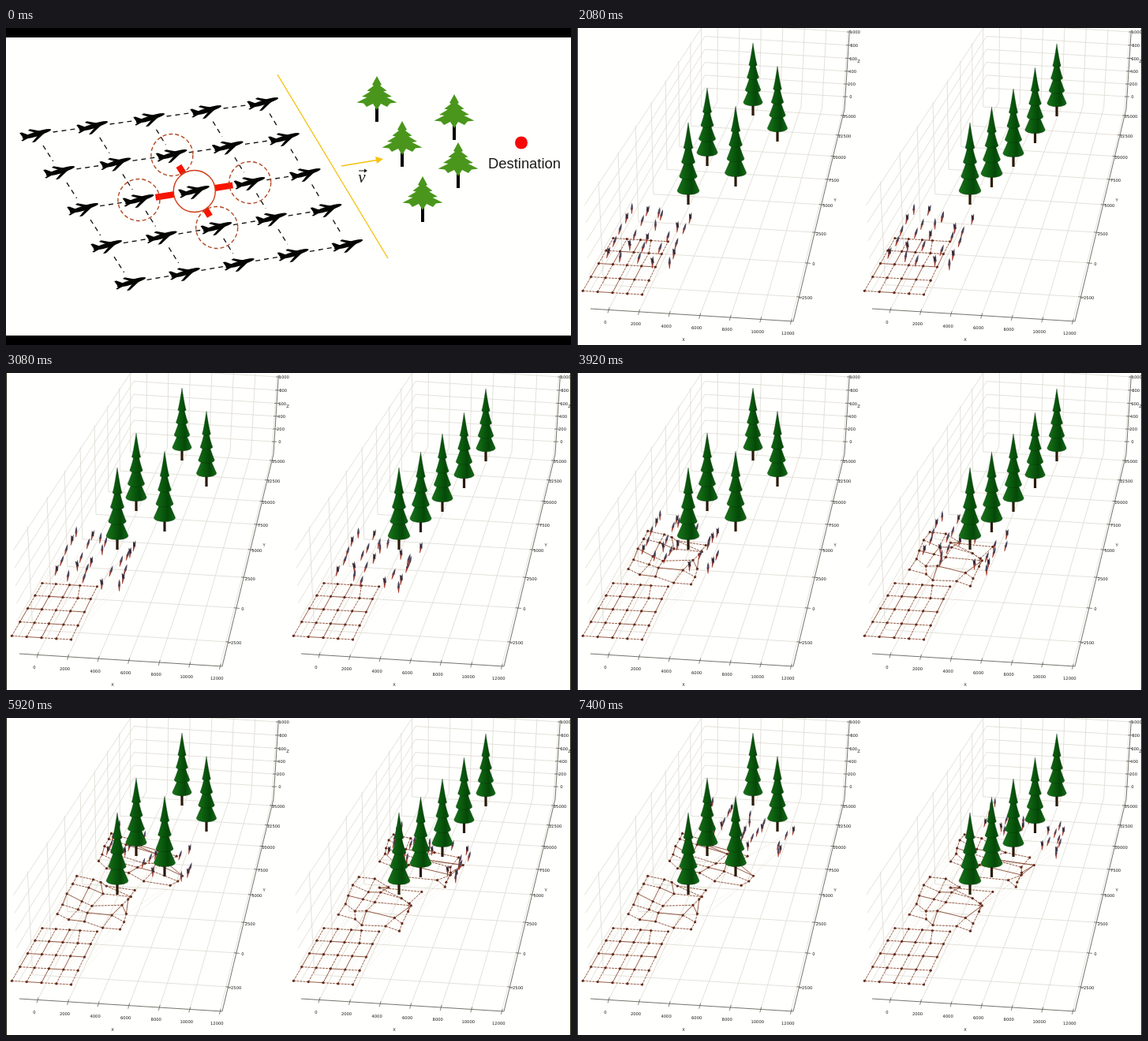
An HTML page with a canvas that plays this animation: 716x402 px, repeating every 7.56 s.

```html
<!DOCTYPE html>
<html lang="en">
<head>
<meta charset="utf-8">
<title>Swarm flight</title>
<style>
html, body { margin: 0; width: 100%; height: 100%; overflow: hidden; background: #fffffd; }
canvas { display: block; width: 716px; height: 402px; }
</style>
</head>
<body>
<canvas id="stage" width="716" height="402"></canvas>
<script>
const W = 716, H = 402, LOOP = 7560, CUT = 800, PANEL = 357;
const START = 850, LEG = 2270, STOP = 7400;
const PAPER = '#fffffd', INK = '#050500', BROWN = '#8a4a34';
const stage = document.getElementById('stage').getContext('2d');

function layer(paint) {
  const c = document.createElement('canvas');
  c.width = W; c.height = H;
  paint(c.getContext('2d'));
  return c;
}
function line(g, a, b, color, width = 1, dash = []) {
  g.strokeStyle = color;
  g.lineWidth = width;
  g.setLineDash(dash);
  g.beginPath();
  g.moveTo(a[0], a[1]);
  g.lineTo(b[0], b[1]);
  g.stroke();
  g.setLineDash([]);
}
function disc(g, x, y, r, color) {
  g.fillStyle = color;
  g.beginPath();
  g.arc(x, y, r, 0, 7);
  g.fill();
}
function ring(g, [x, y], color, dash) {
  g.strokeStyle = color;
  g.lineWidth = 1.4;
  g.setLineDash(dash);
  g.beginPath();
  g.arc(x, y, 26.5, 0, 7);
  g.stroke();
  g.setLineDash([]);
}
function poly(g, pts, color) {
  g.fillStyle = color;
  g.beginPath();
  pts.forEach(([x, y]) => g.lineTo(x, y));
  g.fill();
}
function label(g, s, x, y, font) {
  g.font = font;
  g.fillStyle = '#1a1a1a';
  g.textAlign = 'center';
  g.textBaseline = 'middle';
  g.fillText(s, x, y);
}
const mix = (a, b, f) => [a[0] + (b[0] - a[0]) * f, a[1] + (b[1] - a[1]) * f];
const noise = n => { const s = Math.sin(n * 127.1 + 3) * 43758.5; return s - Math.floor(s) - .5; };

// A 5 x 5 formation: i counts along a row, j counts rows.
const formation = place => Array.from({ length: 25 }, (_, k) => place(k % 5, Math.floor(k / 5), k));

function links(pts, visit) {
  for (let k = 0; k < 25; k++) {
    if (k % 5 < 4) visit(pts[k], pts[k + 1], k, k + 1);
    if (k < 20) visit(pts[k], pts[k + 5], k, k + 5);
  }
}

/* ---- opening diagram ---- */

const fleet = formation((i, j) => [38 + 72 * i + 30 * j - .8 * i * j, 135 - 10 * i + 47 * j - .5 * i * j]);
const HUB = 12, AROUND = [7, 11, 13, 17];

function airliner(g, [x, y]) {
  g.save();
  g.translate(x, y);
  g.rotate(-.2);
  g.fillStyle = INK;
  g.beginPath();
  g.ellipse(1, -.5, 19, 3, -.1, 0, 7);
  g.fill();
  poly(g, [[-17, 1], [-20, -6], [-17, -6], [-9, -1]], INK);
  poly(g, [[-14, 1], [-20, 4], [-18, 5], [-9, 2]], INK);
  poly(g, [[4, 0], [-7, 9], [-3, 9], [10, 1]], INK);
  poly(g, [[7, -3], [-6, -8], [-9, -7], [0, -2]], INK);
  g.restore();
}

function broadTree(g, x, y) {
  g.fillStyle = '#000';
  g.fillRect(x - 2, y + 26, 4, 32);
  const side = [];
  for (let n = 0; n < 4; n++) {
    const reach = 6 + 6.5 * n, drop = 11 + 7.5 * n;
    side.push([reach, drop], [reach * .66, drop + 1]);
  }
  side.push([13, 39], [5, 35]);
  const mirrored = side.map(([a, b]) => [-a, b]).reverse();
  const outline = [[0, 0], ...side, [0, 43], ...mirrored];
  poly(g, outline.map(([a, b]) => [x + a, y + b]), '#4a961c');
}

const diagram = layer(g => {
  g.fillStyle = '#000';
  g.fillRect(0, 0, W, H);
  g.fillStyle = PAPER;
  g.fillRect(0, 12, W, 378);

  links(fleet, (a, b, m, n) => {
    if (m === HUB || n === HUB) line(g, mix(a, b, .3), mix(a, b, .69), '#f81400', 8);
    else line(g, mix(a, b, .3), mix(a, b, .72), '#111', 1.3, [6, 5]);
  });
  AROUND.forEach(n => ring(g, fleet[n], '#b04a24', [5, 3]));
  disc(g, ...fleet[HUB], 26.5, PAPER);
  ring(g, fleet[HUB], '#d03c18', []);
  fleet.forEach(p => airliner(g, p));

  line(g, [344, 59], [484, 292], '#f5c211', 1.4);
  line(g, [425, 175], [470, 167.5], '#f5c211', 1.6);
  poly(g, [[478, 166], [468, 163], [470, 172]], '#f5c211');
  label(g, 'v', 451, 190, 'italic 21px "Liberation Serif", serif');
  line(g, [447, 181], [456, 181], '#111', 1);
  poly(g, [[458, 181], [454, 178.5], [454, 183.5]], '#111');

  for (const [x, y] of [[470, 61], [502, 118], [568, 84], [573, 145], [528, 188]]) broadTree(g, x, y);
  disc(g, 653, 145.5, 8, '#f50808');
  label(g, 'Destination', 657, 173, '18.4px "Liberation Sans", Arial, sans-serif');
});

/* ---- 3D plots ---- */

// Perspective of the plot box; u, v and z run from 0 to 1.
function project(u, v, z = 0) {
  const w = 1 + .452 * v - .05 * z;
  return [(257 * u + 218.2 * v + 17 - 8 * z) / w, (16 * u - 222.4 * v + 356 - 145.6 * z) / w];
}
// Inverse of project() on the floor.
function floorAt(x, y) {
  const skew = 16 / 257, lean = .452 * x - 218.2;
  const v = (356 - y + skew * (x - 17)) / (222.4 + .452 * y - skew * lean);
  return [(x - 17 + v * lean) / 257, v];
}

function axes(g) {
  const grid = (a, b) => line(g, project(...a), project(...b), '#dedad2', .8);
  const tick = '5.2px "DejaVu Sans", sans-serif';
  const edge = '#66645c';
  for (let i = 0; i < 7; i++) {
    const u = .0895 + .15 * i, [x, y] = project(u, 0);
    grid([u, 0], [u, 1]);
    grid([u, 1], [u, 1, 1]);
    line(g, [x + 1, y - 3], [x - 1, y + 4], edge, .8);
    label(g, 2000 * i, x - 4, y + 16, tick);
  }
  for (let i = 0; i < 8; i++) {
    const v = .0823 + .125 * i, [x, y] = project(1, v);
    grid([0, v], [1, v]);
    grid([0, v], [0, v, 1]);
    line(g, [x - 3, y - .3], [x + 4, y + .5], edge, .8);
    label(g, String(2500 * (i - 1)).replace('-', '\u2212'), x + 8, y + 2, tick);
  }
  for (let i = 0; i < 6; i++) {
    const z = .164 + .163 * i, [x, y] = project(1, 1, z);
    grid([0, 0, z], [0, 1, z]);
    grid([0, 1, z], [1, 1, z]);
    line(g, [x - 3, y], [x + 3, y], edge, .8);
    label(g, 200 * i, x + 7, y + 1, tick);
  }
  line(g, project(0, 0), project(1, 0), edge, .9);
  line(g, project(1, 0), project(1, 1), edge, .9);
  line(g, project(1, 1), project(1, 1, 1), edge, .9);
  label(g, 'X', 135, 396, tick);
  label(g, 'Y', 327, 219, tick);
  label(g, 'Z', 357, 43, tick);
}

// Four stacked skirts, drawn from the lowest up.
function fir(g, [x, bottom]) {
  const h = 82 + (bottom - 101) * .107, top = bottom - h, r = h * .15;
  g.fillStyle = '#2a1a08';
  g.fillRect(x - 1.6, bottom - 3, 3.2, 13);
  const shade = g.createLinearGradient(x - r, 0, x + r, 0);
  shade.addColorStop(0, '#1a741a');
  shade.addColorStop(.4, '#0a5a0e');
  shade.addColorStop(.65, '#054808');
  shade.addColorStop(1, '#146a18');
  for (let n = 3; n >= 0; n--) {
    const peak = top + h * .19 * n, rim = top + h * (.36 + .205 * n);
    const hw = r * (.42 + .19 * n), dip = hw * .4;
    g.fillStyle = shade;
    g.beginPath();
    g.moveTo(x, peak);
    g.quadraticCurveTo(x + hw * .7, rim - dip * 2.6, x + hw, rim - dip);
    g.bezierCurveTo(x + hw, rim + dip * .3, x - hw, rim + dip * .3, x - hw, rim - dip);
    g.quadraticCurveTo(x - hw * .7, rim - dip * 2.6, x, peak);
    g.fill();
    g.strokeStyle = 'rgba(0,40,0,.45)';
    g.lineWidth = .7;
    g.stroke();
  }
}

// Where drone (i, j) is after `legs` legs: a steady course, scatter, and a sidestep at each trunk.
function position(i, j, k, legs, trunks, seed) {
  const u0 = -.085 + .075 * i, v0 = .057 + .05 * j;
  const speed = .255 - .013 * i - .006 * j;
  const course = s => u0 + (.02 + .0175 * i) * s + (.016 + .001 * i) * s * s;
  const scatter = legs / (.5 + legs);
  const v = v0 + speed * legs + .04 * noise(k + seed) * scatter;
  let u = course(legs) + .04 * noise(k + seed + 50) * scatter;
  for (const [tu, tv] of trunks) {
    const miss = course((tv - v0) / speed) - tu;
    const push = Math.max(0, .1 - Math.abs(miss)) * Math.exp(-(((v - tv) / .13) ** 2));
    u += miss < 0 ? -push : push;
  }
  return project(u, v);
}

function makeSwarm(trees, seed) {
  const trunks = trees.map(([x, y]) => floorAt(x, y + 9));
  const pose = legs => formation((i, j, k) => position(i, j, k, legs, trunks, seed));
  return { trees, pose, marks: [0, 1, 2].map(pose) };
}
const scattered = [[223, 101], [254, 134], [165, 165], [201, 191], [141, 214]];
const inLine = [4, 3, 2, 1, 0].map(n => [141 + 27.5 * n, 214 - 20 * n - 2 * n * n]);
const swarms = [makeSwarm(scattered, 1), makeSwarm(inLine, 200)];

function mesh(g, pts) {
  links(pts, (a, b, m, n) => line(g, a, b, BROWN, .9, (m + n) % 3 ? [3, 1] : []));
  pts.forEach(([x, y]) => disc(g, x, y, 1.6, '#642c1c'));
}

function drone(g, [x, y], k) {
  const s = .65 + y / 900;
  g.save();
  g.translate(x, y);
  g.scale(s, s);
  g.rotate(.12 + .35 * noise(k + 9));
  poly(g, [[-1.5, -1], [1.6, -1], [.2, 8], [-.6, 8]], '#a23a2c');
  poly(g, [[-1.5, 2], [-.9, -4], [.5, -8], [1.5, -3], [1.4, 1]], '#4a465c');
  if (k % 3 === 0) poly(g, [[-2.8, -6], [0, -4], [2.2, 1], [-1.6, 0]], '#3a2830');
  g.restore();
}

function paintSwarm(g, { pose, marks }, t) {
  const legs = Math.max(0, Math.min(t, STOP) - START) / LEG;
  const now = pose(legs), passed = marks.slice(0, Math.floor(legs) + 1);
  const streak = `rgba(150,50,35,${Math.max(0, .8 - 2 * legs)})`;
  now.forEach((p, k) => {
    const trail = [...passed.map(m => m[k]), p];
    for (let n = 1; n < trail.length; n++)
      line(g, trail[n - 1], trail[n], 'rgba(160,140,110,.4)', .6, [1, 2]);
    line(g, marks[0][k], p, streak, 1.5);
  });
  passed.forEach(m => mesh(g, m));
  for (let k = 24; k >= 0; k--) drone(g, now[k], k);
}

function eachPanel(g, paint) {
  swarms.forEach((s, n) => {
    g.save();
    g.translate(n * PANEL, 0);
    paint(s);
    g.restore();
  });
}
const backdrop = layer(g => {
  g.fillStyle = PAPER;
  g.fillRect(0, 0, W, H);
  eachPanel(g, () => axes(g));
  g.fillStyle = '#222210';
  g.fillRect(0, 0, 1, H);
  g.fillRect(W - 1, 0, 1, H);
});
const forest = layer(g => eachPanel(g, s => s.trees.forEach(tree => fir(g, tree))));

function frame() {
  const t = performance.now() % LOOP;
  if (t < CUT) {
    stage.drawImage(diagram, 0, 0);
  } else {
    stage.drawImage(backdrop, 0, 0);
    eachPanel(stage, s => paintSwarm(stage, s, t));
    stage.drawImage(forest, 0, 0);
  }
  requestAnimationFrame(frame);
}
frame();
</script>
</body>
</html>
```
